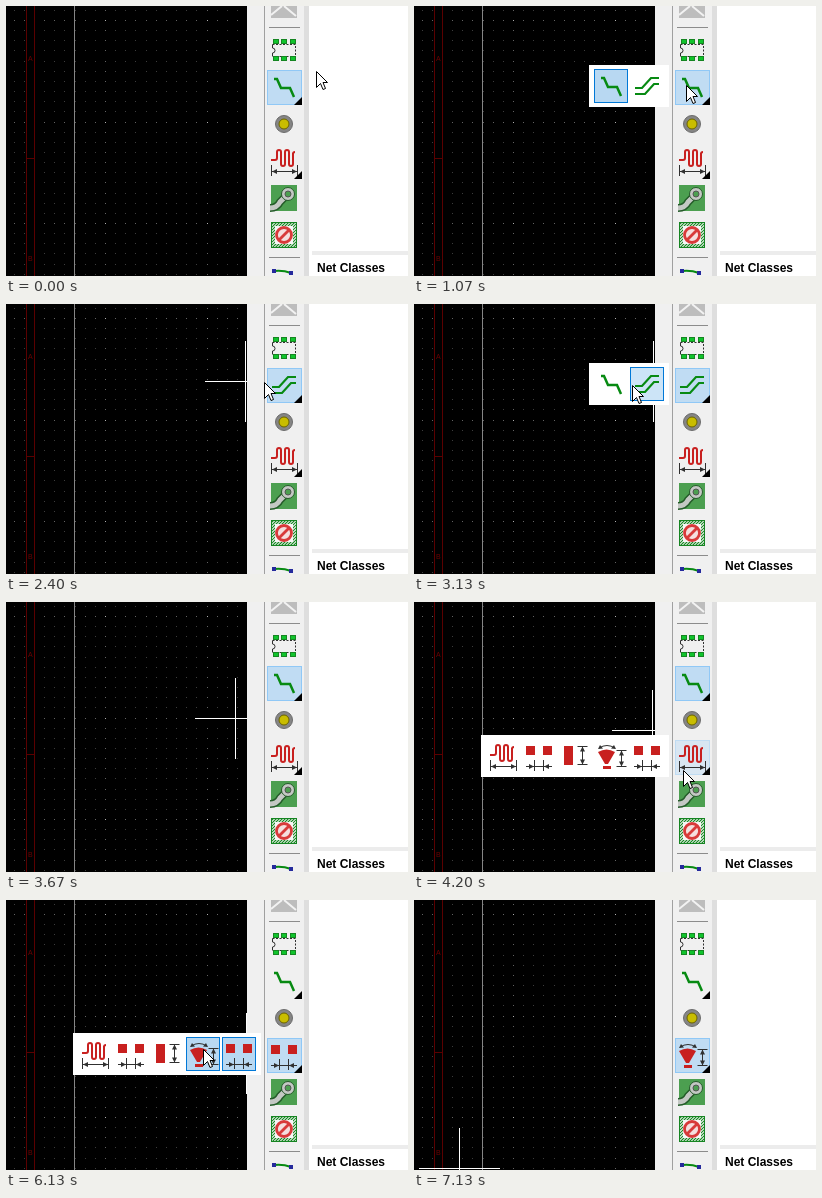
Animation, 402 px wide and 270 px high, one loop 7.47 s. Source, as an HTML page with a canvas:

```html
<!DOCTYPE html>
<html lang="en">
<head>
<meta charset="utf-8">
<title>Toolbar palettes</title>
<style>
html, body { margin: 0; width: 100%; height: 100%; overflow: hidden; background: #fff; }
canvas { display: block; width: 402px; height: 270px; }
</style>
</head>
<body>
<canvas id="stage" width="402" height="270"></canvas>
<script>
const g = document.getElementById('stage').getContext('2d');
const LOOP = 7470, TICK = 1000 / 15, EDGE = 241;
const GREEN = '#078a12', RED = '#c8201f', DARK = '#303030';

// Pointer path: tick, x, y
const path = [
  [1, 310, 65], [6, 284, 78], [10, 284, 78], [11, 282, 79], [15, 282, 79],
  [23, 201, 80], [25, 201, 80], [27, 230, 79], [32, 230, 79], [34, 239, 77],
  [38, 277, 79], [40, 277, 79], [47, 218, 81], [50, 200, 81], [52, 200, 81],
  [56, 238, 128], [60, 277, 160], [63, 269, 168], [65, 258, 165], [66, 258, 165],
  [69, 236, 160], [76, 236, 160], [78, 240, 153], [82, 281, 148], [83, 281, 148],
  [88, 234, 150], [92, 197, 149], [101, 197, 149], [107, 45, 268]
];
const routePalette = { x: 175, y: 59, icons: [track, pair] };
const tunePalette = { x: 67, y: 133, icons: [meander, gap, height, cone, gap] };
const openings = [[16, 32, routePalette], [41, 52, routePalette], [62, 74, tunePalette], [85, 95, tunePalette]];

function rect(x, y, w, h, color) {
  g.fillStyle = color;
  g.fillRect(x, y, w, h);
}

function frame(x, y, w, h, fill, edge) {
  rect(x, y, w, h, edge);
  rect(x + 1, y + 1, w - 2, h - 2, fill);
}

function stroke(d, color, width = 1) {
  g.strokeStyle = color;
  g.lineWidth = width;
  g.stroke(new Path2D(d));
}

function fill(d, color) {
  g.fillStyle = color;
  g.fill(new Path2D(d));
}

function disc(x, y, r, color, edge, width) {
  g.beginPath();
  g.arc(x, y, r, 0, 7);
  if (color) { g.fillStyle = color; g.fill(); }
  if (edge) { g.strokeStyle = edge; g.lineWidth = width; g.stroke(); }
}

function at(x, y, draw) {
  g.save();
  g.translate(x, y);
  draw();
  g.restore();
}

// Icons, drawn around their centre
function track() {
  stroke('M-10-8H-7L-3 1H6L10 10', GREEN, 2.5);
}

function pair() {
  stroke('M-12 2H-5L4-8H12M-12 8H-2L7-2H12', GREEN, 2.2);
}

function meander() {
  stroke('M-13-1h4q2 0 2-2V-9a2 2 0 0 1 4 0V3a2 2 0 0 0 4 0V-9a2 2 0 0 1 4 0V3a2 2 0 0 0 4 0V-8', RED, 2);
  stroke('M9-4V-7q0-2 2-2', RED, 2);
  stroke('M-12.5 4V15M13.5 4V15M-12 10.5H13', DARK);
  fill('M-12 10.5l5-2.5v5zM13 10.5l-5-2.5v5z', DARK);
}

function gap() {
  rect(-13, -10, 9, 9, RED);
  rect(4, -10, 9, 9, RED);
  stroke('M-4.5 4V15M4.5 4V15M-13 10.5H13', DARK);
  fill('M-5 10.5l-5-2.5v5zM5 10.5l5-2.5v5z', DARK);
}

function heightMark(x, top, bottom) {
  stroke(`M${x - 5} ${top}h10M${x - 5} ${bottom}h10M${x} ${top}V${bottom}`, DARK);
  fill(`M${x} ${top}l-2.5 5h5zM${x} ${bottom}l-2.5-5h5z`, DARK);
}

function height() {
  rect(-11, -10, 9, 19, RED);
  heightMark(7.5, -9.5, 8.5);
}

function cone() {
  fill('M-13-4Q-4.500-9 4-4L-3 8H-6Z', RED);
  rect(-8, 10, 8, 3, RED);
  stroke('M-12-8Q-4-13 4-8', DARK);
  fill('M-13-7l2-4 3 3.500zM5-7l-2-4-3 3.500z', DARK);
  heightMark(10.5, -5.5, 10.5);
}

function footprint() {
  g.setLineDash([2, 1.5]);
  stroke('M-11.500-5.500H11.500V6.500H-11.500V3.500', DARK);
  g.setLineDash([]);
  stroke('M-11.500-5.500V-2a2.500 2.500 0 0 1 0 5V6', DARK);
  for (const x of [-11, -3, 6])
    for (const y of [-11, 6]) frame(x, y, 6, 5, '#10c42c', '#168522');
}

function zone() {
  rect(-13, -13, 26, 26, '#4c9f50');
  stroke('M-14 10Q-7 10-4 4L2-2', '#245b29', 8);
  stroke('M-14 10Q-7 10-4 4L2-2', '#c4c8c4', 5);
  disc(4, -4, 6.5, '#c4c8c4', '#245b29', 1);
  disc(4, -4, 3, '#4c9f50', '#555', 1);
}

function keepout() {
  rect(-13, -13, 26, 26, '#fff');
  g.save();
  g.beginPath();
  g.rect(-13, -13, 26, 26);
  g.clip();
  for (let k = -26; k < 28; k += 3) stroke(`M${k - 13} 13l26-26`, '#168522', 1.2);
  g.restore();
  rect(-9, -9, 18, 18, '#f6f6f6');
  g.strokeStyle = '#168522';
  g.lineWidth = 1;
  g.strokeRect(-12.5, -12.5, 25, 25);
  disc(0, 0, 7.5, '#f5dede', '#d83a3a', 2.8);
  stroke('M-5 5L5-5', '#d83a3a', 2.8);
}

function drawBoard() {
  rect(0, 0, EDGE, 270, '#000');
  for (let i = -9; i < 14; i++)
    for (let j = -1; j < 26; j++) {
      const major = (i % 10 === 0) + (j % 10 === 0);
      rect(Math.round(99 + i * 10.15), Math.round(14 + j * 10.15), 1, 1, ['#3c3c3c', '#626262', '#b0b0b0'][major]);
    }
  rect(20, 0, 1, 270, '#5a0000');
  rect(28, 0, 1, 270, '#5a0000');
  rect(20, 152, 9, 1, '#5a0000');
  g.font = '7px "Liberation Sans", sans-serif';
  g.fillStyle = '#680000';
  g.fillText('A', 22, 55);
  g.fillText('B', 22, 255);
  rect(68, 0, 1, 270, '#858585');
}

function button(y, state) {
  if (state === 'on') frame(261, y, 35, 35, '#c0dcf3', '#90c8f6');
  if (state === 'hover') frame(261, y, 35, 35, '#d8e6f2', '#c0dcf3');
}

function drawToolbar(n, p) {
  rect(EDGE, 0, 161, 270, '#f0f0f0');
  rect(258, 0, 1, 270, '#a0a0a0');
  rect(298, 0, 5, 270, '#dedede');
  rect(303, 0, 99, 270, '#fff');
  rect(306, 245, 96, 4, '#ececec');
  g.fillStyle = '#000';
  g.font = 'bold 12px "Liberation Sans", Arial, sans-serif';
  g.fillText('Net Classes', 311, 266);

  rect(265, 0, 26, 12, '#bdbdbd');
  stroke('M265 9L276 0M278 0L290 10', '#f2f2f2', 2);
  rect(263, 21, 31, 1, '#8c8c8c');
  rect(263, 251, 31, 1, '#8c8c8c');

  const tuning = n >= 74;
  const over = p.x >= 261 && p.x < 296 && p.y >= 138 && p.y < 173;
  button(64, tuning ? '' : 'on');
  button(138, tuning ? 'on' : over ? 'hover' : '');
  at(278, 44, footprint);
  at(278, 81, n >= 32 && n < 52 ? pair : track);
  disc(278, 118, 8.5, '#858585', '#6c6c6c', 1);
  disc(278, 118, 5, '#c9bd00', '#6b6400', 1);
  at(278, 155, n < 74 ? meander : n < 95 ? gap : cone);
  fill('M296 91v8h-8zM296 165v8h-8z', '#000');
  at(278, 192, zone);
  at(278, 229, keepout);
  stroke('M268 265Q277 264 285 267', GREEN, 2);
  rect(266, 263, 4, 4, '#252a9c');
  rect(283, 265, 4, 4, '#252a9c');
}

function pointer(n) {
  const i = path.findIndex(k => k[0] >= n);
  if (i < 1) {
    const end = path[i < 0 ? path.length - 1 : 0];
    return { x: end[1], y: end[2] };
  }
  const [t0, x0, y0] = path[i - 1], [t1, x1, y1] = path[i];
  const k = (n - t0) / (t1 - t0);
  return { x: Math.round(x0 + (x1 - x0) * k), y: Math.round(y0 + (y1 - y0) * k) };
}

const paletteAt = n => openings.find(o => n >= o[0] && n < o[1])?.[2];

// The crosshair stays where the pointer last touched the board
function drawCrosshair(n) {
  for (let k = n; k >= 0; k--) {
    const p = pointer(k);
    if (p.x >= EDGE || paletteAt(k)) continue;
    rect(p.x - 40, p.y, 81, 1, '#fff');
    rect(p.x, p.y - 40, 1, 81, '#fff');
    return;
  }
}

function drawPalette(pal, n, p) {
  rect(pal.x, pal.y, pal.icons.length * 36 + 8, 42, '#fff');
  const active = pal === routePalette ? (n < 32 ? 0 : 1) : n < 74 ? -1 : 4;
  pal.icons.forEach((icon, i) => {
    const x = pal.x + 5 + i * 36, y = pal.y + 4;
    const over = p.x >= x && p.x < x + 35 && p.y >= y && p.y < y + 35;
    if (over || i === active)
      frame(x, y, 34, 34, over && i === active ? '#cce4f7' : '#b8d8f2', '#0078d7');
    at(x + 17, y + 17, icon);
  });
}

function drawArrow() {
  const d = 'M.5.5V16.500L4.500 12.500L7 18.500L9.500 17.500L7 11.500H11.500Z';
  fill(d, '#fff');
  stroke(d, '#000');
}

function draw(now) {
  const n = Math.floor((now % LOOP + 5) / TICK);
  const p = pointer(n), pal = paletteAt(n);
  drawBoard();
  drawCrosshair(n);
  drawToolbar(n, p);
  if (pal) drawPalette(pal, n, p);
  if (pal || p.x >= EDGE) at(p.x, p.y, drawArrow);
}

const start = performance.now();
function loop() {
  draw(performance.now() - start);
  requestAnimationFrame(loop);
}
loop();
</script>
</body>
</html>
```
